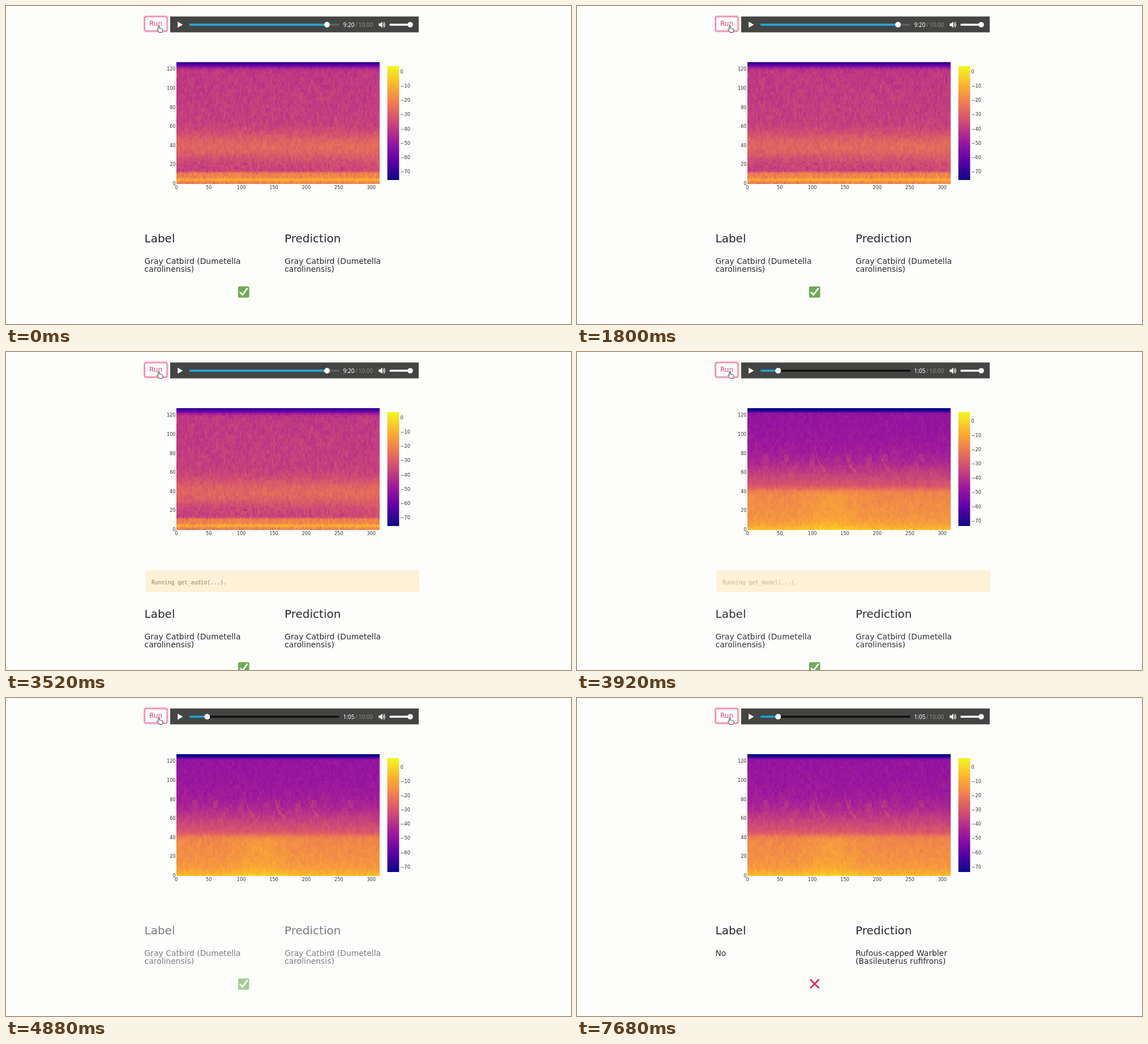
An HTML page with a canvas that plays this animation: 998x561 px, repeating every 8 s.

```html
<!DOCTYPE html>
<html lang="en">
<head>
<meta charset="utf-8">
<title>Bird call demo</title>
<style>
  html, body { margin: 0; width: 100%; height: 100%; overflow: hidden; background: #fdfdfc; }
  #stage { position: absolute; left: 0; top: 0; width: 998px; height: 561px; overflow: hidden; }
  canvas { position: absolute; left: 301px; top: 99px; width: 359px; height: 215px; }
  svg { position: absolute; left: 0; top: 0; font-family: "DejaVu Sans", sans-serif; fill: #2a2a2c; }
  .head { font-size: 20px; }
  .body { font-size: 13.9px; }
  .tick { font-size: 8.2px; fill: #333; }
  .time { font: 10px "Noto Sans", "Open Sans", sans-serif; }
  .mono { font: 9.6px "DejaVu Sans Mono", monospace; fill: #8d8266; }
</style>
</head>
<body>
<div id="stage">
  <canvas id="specA" width="313" height="128"></canvas>
  <canvas id="specB" width="313" height="128"></canvas>
  <svg width="998" height="561" viewBox="0 0 998 561">
    <defs><linearGradient id="plasma" x1="0" y1="1" x2="0" y2="0"></linearGradient></defs>

    <g id="button">
      <rect x="244" y="17.8" width="41.4" height="27.4" rx="3.5" fill="#fff" stroke="#f9b9cc" stroke-width="2.6"/>
      <rect x="245.3" y="19.1" width="38.8" height="24.8" rx="2.5" fill="#fff" stroke="#ee6c93" stroke-width="1.2"/>
      <text x="253" y="35" font-size="12" fill="#dc3f7c">Run</text>
    </g>

    <g id="player">
      <rect x="290" y="18.5" width="439" height="28" fill="#444543"/>
      <path d="M303.2 27.6 L312.4 32.9 L303.2 38.2Z" fill="#fff"/>
      <rect id="track" x="324" y="31.3" width="264.5" height="3.4" rx="1"/>
      <rect id="played" x="324" y="31.3" height="3.4" rx="1" fill="#22a8de"/>
      <circle id="knob" cy="33" r="5" fill="#fff"/>
      <text class="time" x="595.6" y="36.7" fill="#fff" id="clock"></text>
      <text class="time" x="617" y="36.7" fill="#8d8d8c">/</text>
      <text class="time" x="622.6" y="36.7" fill="#8d8d8c">10:00</text>
      <path d="M658.2 30.8 H661 L664.6 27.6 V38.4 L661 35.2 H658.2Z" fill="#fff"/>
      <path d="M666 30.4 Q668 33 666 35.6 M667.3 28.2 Q671.3 33 667.3 37.8" fill="none" stroke="#fff" stroke-width="1.2"/>
      <rect x="677.5" y="31.3" width="36" height="3.4" rx="1" fill="#fff"/>
      <circle cx="714" cy="33" r="4.8" fill="#fff"/>
    </g>

    <path d="M268.9 41.2 V36 Q268.9 34.6 270 34.6 Q271.1 34.6 271.1 36 V39 Q273 38.4 273.4 39.6 Q275 39.2 275.3 40.3 Q277 40 277 41.6 V43.4 L275.7 46.6 H270.2 L266.8 42.2 Q266.2 40.8 267.5 40.6Z"
          fill="#fff" stroke="#333" stroke-linejoin="round"/>

    <g id="axes"></g>
    <rect x="673.6" y="106" width="20.8" height="201" fill="url(#plasma)"/>
    <g id="barA"></g>
    <g id="barB"></g>

    <g id="notice">
      <rect x="246.5" y="385" width="483.5" height="39" rx="2" fill="#fdf1d8"/>
      <text class="mono" x="257" y="410.4" id="status"></text>
    </g>

    <g id="result">
      <text class="head" x="244.5" y="417">Label</text>
      <text class="head" x="492" y="417">Prediction</text>
      <g id="right" class="body"></g>
      <g id="wrong" class="body"></g>
    </g>
  </svg>
</div>
<script>
const $ = id => document.getElementById(id);
const LOOP = 8000, COLS = 313, ROWS = 128;
const PLASMA = ["#0d0887", "#5c01a6", "#9c179e", "#cc4778", "#ed7953", "#fdb32f", "#f0f921"];
const RGB = PLASMA.map(h => [1, 3, 5].map(i => parseInt(h.slice(i, i + 2), 16)));

function add(parent, tag, attrs, text = "") {
  const el = document.createElementNS("http://www.w3.org/2000/svg", tag);
  for (const k in attrs) el.setAttribute(k, attrs[k]);
  el.textContent = text;
  parent.appendChild(el);
}

const clamp = (v, lo, hi) => Math.max(lo, Math.min(hi, v));
const ramp = (t, from, to) => clamp((t - from) / (to - from), 0, 1);
const rise = (x, at, width) => 1 / (1 + Math.exp((at - x) / width));
const fall = (x, at, width) => 1 - rise(x, at, width);
const bump = (x, at, width) => Math.exp(-(((x - at) / width) ** 2));

function color(v) {
  const p = clamp(v, 0, 0.9999) * (RGB.length - 1), i = Math.floor(p);
  return RGB[i].map((c, k) => c + (RGB[i + 1][k] - c) * (p - i));
}

// Repeatable noise from -1 to 1.
function noise(x, y, seed) {
  let h = Math.imul(x + 101, 374761393) ^ Math.imul(y + 57, 668265263) ^ Math.imul(seed, 974634777);
  h = Math.imul(h ^ (h >>> 13), 1274126177);
  h = Math.imul(h ^ (h >>> 15), 2246822519);
  return ((h ^ (h >>> 16)) >>> 0) / 2147483648 - 1;
}

function grain(col, row, seed) {
  return 0.35 * noise(col >> 2, row >> 2, seed) + 0.35 * noise(col >> 1, row >> 1, seed + 1) +
    0.5 * noise(col, row >> 2, seed + 2);
}

function drawSpectrum(canvas, level) {
  const ctx = canvas.getContext("2d"), img = ctx.createImageData(COLS, ROWS);
  for (let row = 0; row < ROWS; row++) {
    for (let col = 0; col < COLS; col++) {
      img.data.set([...color(level(col, row)), 255], ((ROWS - 1 - row) * COLS + col) * 4);
    }
  }
  ctx.putImageData(img, 0, 0);
}

// Even hiss, a warm middle band and a bright hum at the bottom.
function levelA(col, row) {
  const base = .49 - .04 * row / ROWS + .13 * bump(row, 39, 15) + .21 * fall(row, 12, .5) +
    .13 * bump(row, 4, 1.8) - .4 * rise(row, 123.2, 1.4);
  const speck = row < 28 && noise(col, row >> 1, 8) > .86 ? -.09 : 0;
  const streak = row > 55 && row < 118 && noise(col, row >> 3, 10) > .95 ? .06 : 0;
  const drift = .03 * (col / COLS - .5) * fall(row, 50, 3);
  return base + speck + streak + drift + .055 * fall(row, 123, 1) * grain(col, row, 3);
}

// Quiet highs over loud lows, with falling whistles in between.
function levelB(col, row) {
  const base = .31 + .08 * (1 - row / ROWS) + .21 * fall(row, 61, 8) + .14 * fall(row, 42.5, 1.5) +
    .12 * Math.exp(-row / 6) - .32 * rise(row, 123.6, .5);
  const swell = .05 * bump(col, 130, 42) * fall(row, 42, 2);
  const whistle = [104, 150, 203].some(start => {
    const age = col - start;
    return age >= 0 && age < 17 && Math.abs(row - 59 - 26 * Math.exp(-age / 7)) < 2;
  });
  const chatter = bump(row, 72, 14) * Math.max(0, noise(col >> 3, row >> 3, 31) - .6) * .14;
  return base + swell + chatter + (whistle ? .06 : 0) + .042 * fall(row, 123, .5) * grain(col, row, 21);
}

function colorbar(group, zero) {
  for (let i = 0; i < 8; i++) {
    add(group, "text", { x: 696.6, y: zero + i * 25.15 + 3, class: "tick" }, i ? "\u2212" + i * 10 : "0");
  }
}

function lines(group, x, texts) {
  texts.forEach((text, i) => add(group, "text", { x, y: 455 + i * 13.6 }, text));
}

function mark(group, d, stroke) {
  add(group, "path", { d, stroke, fill: "none", "stroke-width": 2.8, "stroke-linecap": "round" });
}

PLASMA.forEach((c, i) => add($("plasma"), "stop", { offset: i / (PLASMA.length - 1), "stop-color": c }));
for (let i = 0; i < 7; i++) {
  add($("axes"), "text", { x: 299.6, y: 316 - i * 33.6, class: "tick", "text-anchor": "end" }, i * 20);
  add($("axes"), "text", { x: 300.8 + i * 57.4, y: 323, class: "tick", "text-anchor": "middle" }, i * 50);
}
colorbar($("barA"), 116);
colorbar($("barB"), 121.6);
drawSpectrum($("specA"), levelA);
drawSpectrum($("specB"), levelB);

const catbird = ["Gray Catbird (Dumetella", "carolinensis)"];
lines($("right"), 244.6, catbird);
lines($("right"), 492.2, catbird);
add($("right"), "rect", { x: 410, y: 494.8, width: 19.6, height: 19.6, rx: 2, fill: "#6cab52" });
mark($("right"), "M413.9 505.6 L417.8 509.6 L425.8 498.6", "#fff");
lines($("wrong"), 244.4, ["No"]);
lines($("wrong"), 492, ["Rufous-capped Warbler", "(Basileuterus rufifrons)"]);
mark($("wrong"), "M412.8 497.2 L426.8 511.2 M426.8 497.2 L412.8 511.2", "#d62f55");

const NOTICE_ON = 3240, LOAD = 3800, NOTICE_OFF = 4640, ANSWER = 5440;

function show(id, on) { $(id).style.visibility = on ? "visible" : "hidden"; }

function render(t) {
  const loaded = t >= LOAD, answered = t >= ANSWER;
  const busy = t >= NOTICE_ON && t < NOTICE_OFF;
  const knob = loaded ? 355.3 : 567;
  show("specA", !loaded);
  show("barA", !loaded);
  show("specB", loaded);
  show("barB", loaded);
  $("track").setAttribute("fill", loaded ? "#111" : "#5a6266");
  $("played").setAttribute("width", knob - 324);
  $("knob").setAttribute("cx", knob);
  $("clock").textContent = loaded ? "1:05" : "9:20";

  show("notice", busy);
  $("notice").setAttribute("opacity", ramp(t, NOTICE_ON, NOTICE_ON + 160) - ramp(t, NOTICE_OFF - 140, NOTICE_OFF));
  $("status").setAttribute("opacity", loaded ? ramp(t, LOAD - 100, LOAD + 300) : 1);
  $("status").textContent = `Running ${loaded ? "get_model" : "get_audio"}(...).`;

  // Old results grow pale until the new ones arrive.
  show("right", !answered);
  show("wrong", answered);
  $("result").setAttribute("transform", `translate(0 ${busy ? 52.4 : 0})`);
  $("result").setAttribute("opacity", answered ? .4 + .6 * ramp(t, ANSWER, ANSWER + 160) : 1 - .6 * ramp(t, LOAD, ANSWER));
}

const start = performance.now();
function tick() {
  render((performance.now() - start) % LOOP);
  requestAnimationFrame(tick);
}
tick();
</script>
</body>
</html>
```
